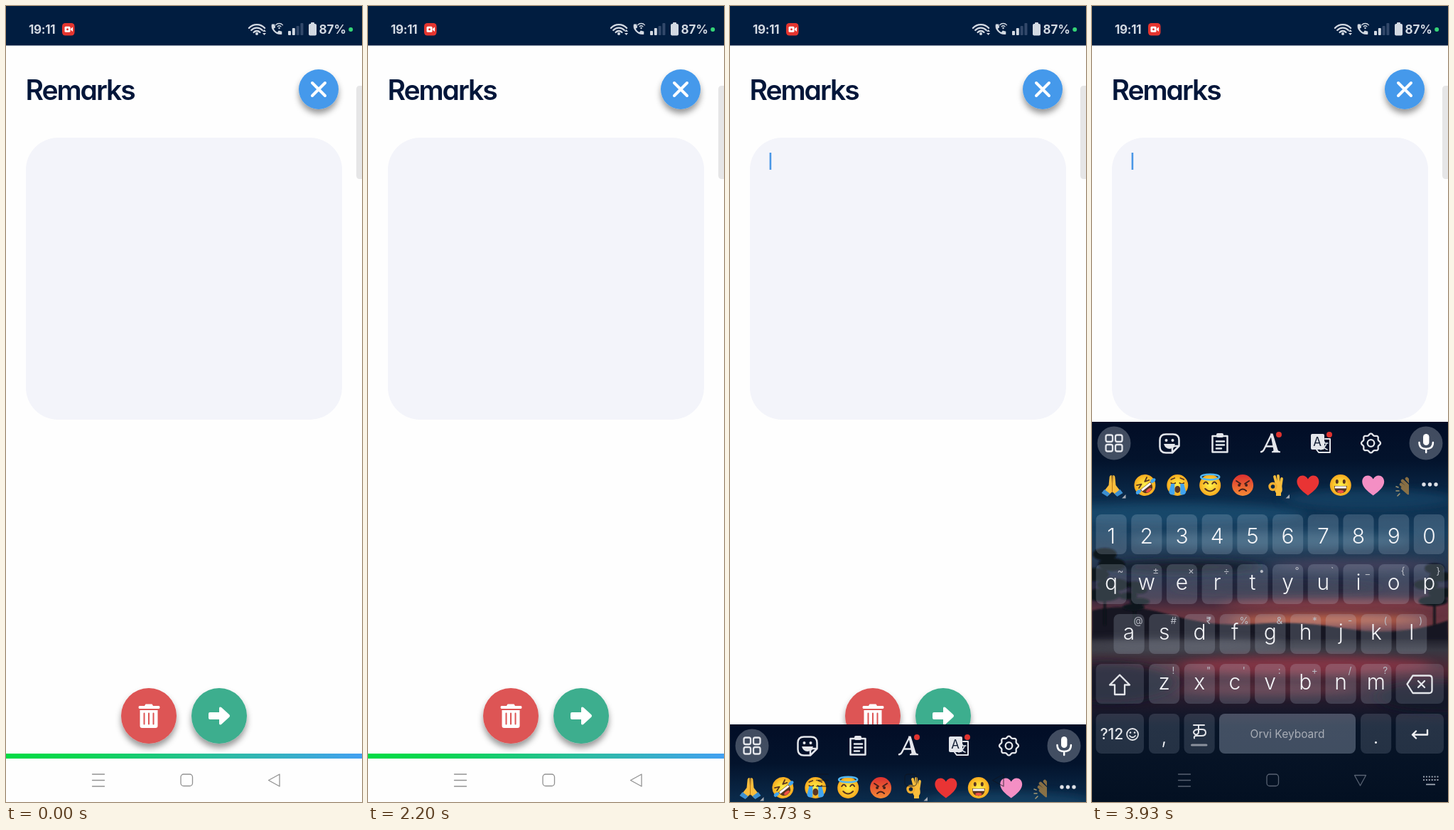
These frames come from a looping animation (501x1118 px, 4000 ms). An HTML page:

```html
<!DOCTYPE html>
<html lang="en">
<head>
<meta charset="utf-8">
<title>Remarks</title>
<style>
html, body { margin: 0; width: 100%; height: 100%; overflow: hidden; background: #fff; }
svg { display: block; width: 100vw; height: 100vh; }
text { font-family: Inter, Roboto, sans-serif; }
.title { font-size: 39px; font-weight: 600; letter-spacing: -2px; font-feature-settings: "cv11"; fill: #02163a; }
.status { font-size: 17px; font-weight: 650; fill: #d3d9e2; }
.key { font-size: 30px; font-weight: 360; fill: #f4f5f8; text-anchor: middle; }
.hint { font-size: 13.5px; fill: #b9bcc5; text-anchor: middle; }
.line { fill: none; stroke-linecap: round; stroke-linejoin: round; }
</style>
</head>
<body>
<svg id="stage" viewBox="0 0 501 1118">
  <defs>
    <linearGradient id="bar">
      <stop offset="0" stop-color="#00db45"/><stop offset=".2" stop-color="#08d650"/>
      <stop offset=".6" stop-color="#2bbd9e"/><stop offset="1" stop-color="#42a0f2"/>
    </linearGradient>
    <linearGradient id="sky" x1="0" y1="0" x2="0" y2="533" gradientUnits="userSpaceOnUse">
      <stop offset="0" stop-color="#020d26"/><stop offset=".1" stop-color="#03132c"/>
      <stop offset=".2" stop-color="#0b2b4b"/><stop offset=".29" stop-color="#163d5d"/>
      <stop offset=".36" stop-color="#243a54"/><stop offset=".42" stop-color="#222740"/>
      <stop offset=".46" stop-color="#30263b"/><stop offset=".5" stop-color="#62323f"/>
      <stop offset=".54" stop-color="#6d363f"/><stop offset=".57" stop-color="#1d1d29"/>
      <stop offset=".6" stop-color="#383842"/><stop offset=".65" stop-color="#4f2735"/>
      <stop offset=".72" stop-color="#281b2c"/><stop offset=".8" stop-color="#081528"/>
      <stop offset="1" stop-color="#031022"/>
    </linearGradient>
    <radialGradient id="sun"><stop offset="0" stop-color="#fff04d"/><stop offset=".6" stop-color="#fdca2f"/><stop offset="1" stop-color="#f7a91f"/></radialGradient>
    <linearGradient id="mad" x2="0" y2="1"><stop offset="0" stop-color="#dc3030"/><stop offset="1" stop-color="#f58a35"/></linearGradient>
    <filter id="soft" x="-50%" y="-150%" width="200%" height="400%"><feGaussianBlur stdDeviation="9 6"/></filter>
    <filter id="edge"><feGaussianBlur stdDeviation="1.2"/></filter>
    <filter id="drop" x="-30%" y="-30%" width="160%" height="170%"><feDropShadow dx="0" dy="6" stdDeviation="4" flood-opacity=".4"/></filter>
    <clipPath id="board"><rect y="-1" width="501" height="536"/></clipPath>
    <clipPath id="cut"><rect x="420" y="70" width="26" height="40"/></clipPath>
  </defs>

  <rect width="501" height="1118" fill="#fefefe"/>
  <rect width="501" height="55.5" fill="#011d40"/>
  <g id="status"></g>

  <text class="title" x="27.500" y="131.800">Remarks</text>
  <circle cx="440" cy="117" r="28" fill="#4499eb" filter="url(#drop)"/>
  <path class="line" d="M431 108l18 18m0-18l-18 18" stroke="#fff" stroke-width="4"/>
  <path d="M501 112h-3q-5 0-5 5v121q0 5 5 5h3z" fill="#e6e6e7"/>
  <rect x="28" y="185" width="445" height="396" rx="45" fill="#f3f4fa"/>

  <circle cx="201" cy="997" r="39" fill="#dd5555" filter="url(#drop)"/>
  <path d="M195 983l1.500-2.500h9l1.500 2.500h8q1.500 0 1.500 2t-1.500 2h-27q-1.500 0-1.500-2t1.500-2zM188.500 989h25v22q0 3-3 3h-19q-3 0-3-3z" fill="#fff"/>
  <path class="line" d="M194.500 993.500v15m6.500-15v15m6.500-15v15" stroke="#dd5555" stroke-width="2"/>
  <circle cx="300" cy="997" r="39" fill="#3eae8e" filter="url(#drop)"/>
  <path d="M287 992h13v-5.500q0-3 3-1.500l11 10q2 2 0 4l-11 10q-3 1.500-3-1.500v-5.500h-13q-2 0-2-2v-6q0-2 2-2z" fill="#fff"/>
  <rect y="1050" width="501" height="7" fill="url(#bar)"/>

  <circle id="touch" cx="247.500" cy="241" r="12.500" fill="#dcdde0" stroke="#b7c4d5" stroke-width="2"/>
  <rect id="caret" x="55.600" y="206" width="2.600" height="24" fill="#4a97e6"/>
  <g id="keyboard" clip-path="url(#board)"></g>
  <g id="nav" class="line" stroke-width="1.300">
    <path d="M121.500 1079h17m-17 8.500h17m-17 8.500h17"/>
    <rect x="246" y="1079" width="16.500" height="16.500" rx="4"/>
    <path id="back"/>
  </g>
  <g id="hide" fill="#a5acb8"></g>
</svg>
<script>
const $ = id => document.getElementById(id);
const LOOP = 4000, PITCH = 49.7;

const line = (d, color, w, more = '') =>
  `<path class="line" d="${d}" stroke="${color}" stroke-width="${w}" ${more}/>`;
const fill = (d, color, more = '') => `<path d="${d}" fill="${color}" ${more}/>`;
const dot = (x, y, r, color) => `<circle cx="${x}" cy="${y}" r="${r}" fill="${color}"/>`;
const oval = (x, y, rx, ry, color, more = '') =>
  `<ellipse cx="${x}" cy="${y}" rx="${rx}" ry="${ry}" fill="${color}" ${more}/>`;
const box = (x, y, w, h, r, color, more = '') =>
  `<rect x="${x}" y="${y}" width="${w}" height="${h}" rx="${r}" fill="${color}" ${more}/>`;
const label = (cls, x, y, s, more = '') => {
  const safe = s.replace('&', '&amp;').replace('<', '&lt;');
  return `<text class="${cls}" x="${x}" y="${y}" ${more}>${safe}</text>`;
};
const arc = (x, y, r) => {
  const k = r * 0.74, h = r * 0.67;
  return `M${x - k} ${y - h}A${r} ${r} 0 0 1 ${x + k} ${y - h}`;
};

function statusBar() {
  const c = '#d3d9e2';
  const bars = [6, 10, 13, 17].map((h, i) =>
    box(397 + i * 5.8, 41 - h, 4, h, 1, i < 2 ? c : '#32486a')).join('');
  return label('status', 32, 38.5, '19:11', 'letter-spacing="-.3"') +
    box(79, 24, 17.500, 17.500, 4.500, '#e5352f') +
    box(82.500, 28.800, 8, 8, 1.500, '#fff') + dot(86.500, 32.800, 1.500, '#e5352f') + fill('M91 32l3-2.500v6.500l-3-2.500z', '#fff') +
    line(arc(353, 41, 6) + arc(353, 41, 10.5) + arc(353, 41, 15), c, 2.300) + dot(353, 39, 2, c) +
    fill('M361 36l2.500-3 2.500 3zM361 38l2.500 3 2.500-3z', c) +
    fill('M374 25.500h4l1.200 4.500-2.400 2q1.700 3.300 5 5l2-2.400 4.500 1.200v4q-7 1-11.500-4t-2.800-10.300z', c) +
    line(arc(384.5, 31, 3.2) + arc(384.5, 31, 6.5), c, 1.400) + dot(384.500, 31, 1.200, c) +
    bars + box(426, 25, 11, 16.500, 2, c) + box(429, 23, 5, 3, 1, c) +
    label('status', 440.5, 38.7, '87%') + dot(485.200, 33, 3, '#35d577');
}

function scenery() {
  const blur = 'filter="url(#soft)"';
  const tree = (x, y, w, h) => {
    let s = '';
    for (let i = 0; i < 5; i++)
      s += oval(x + Math.sin(i * 2.4) * w * 0.3, y + i * h / 7, w * (0.35 + i * 0.04), h / 11, '#0d121d');
    return s + box(x - 1.5, y, 3, h, 0, '#0d121d');
  };
  return box(0, -1, 501, 536, 0, 'url(#sky)') +
    oval(110, 128, 190, 15, '#1e5479', blur + ' opacity=".6"') +
    oval(390, 108, 120, 14, '#174567', blur + ' opacity=".7"') +
    oval(250, 166, 200, 11, '#3f6a86', blur + ' opacity=".6"') +
    oval(130, 203, 110, 9, '#171a2c', blur) +
    oval(370, 200, 120, 8, '#4d4560', blur + ' opacity=".7"') +
    oval(260, 232, 150, 7, '#1f2036', blur + ' opacity=".7"') +
    oval(350, 256, 170, 8, '#9a434a', blur + ' opacity=".7"') +
    oval(330, 277, 140, 6, '#d9734e', blur + ' opacity=".9"') +
    fill('M0 264Q50 252 110 270T230 283T360 290T501 278V304H0Z', '#151822', 'filter="url(#edge)"') +
    `<g filter="url(#edge)">${tree(18, 185, 48, 100)}${tree(60, 228, 30, 55)}${tree(482, 205, 40, 80)}</g>` +
    oval(110, 312, 160, 8, '#55545f', blur + ' opacity=".6"') +
    oval(300, 341, 180, 13, '#97374a', blur + ' opacity=".7"') +
    oval(245, 375, 130, 8, '#6d3341', blur + ' opacity=".6"') +
    oval(20, 365, 100, 28, '#111725', blur + ' opacity=".8"') +
    oval(490, 385, 90, 22, '#111725', blur + ' opacity=".7"');
}

function toolbar() {
  const c = '#e4e6eb', red = '#e0332f';
  const grid = [0, 1, 2, 3].map(i =>
    box(19.5 + i % 2 * 13.5, 17.5 + (i >> 1) * 13.5, 9.500, 9.500, 2.500, 'none', `stroke="${c}" stroke-width="2.300"`)).join('');
  let gear = '';
  for (let i = 0; i <= 64; i++) {
    const a = i / 64 * Math.PI * 2, r = 12.3 + 1.2 * Math.cos(a * 8);
    gear += `${i ? 'L' : 'M'}${(392.5 + r * Math.cos(a)).toFixed(1)} ${(29 + r * Math.sin(a)).toFixed(1)}`;
  }
  return dot(31, 29, 23.5, 'rgba(200,205,215,.32)') + grid +
    line('M104 16.500h10q8.500 0 8.500 8.500v8l-9.500 9.500h-9q-8.500 0-8.500-8.500v-9q0-8.500 8.500-8.500zM122 33h-5q-4 0-4 4v5', c, 2.500) +
    dot(104.500, 25, 2, c) + dot(113.500, 25, 2, c) + fill('M101 30h16q-2 7-8 7t-8-7z', c) +
    line('M169.500 19h21v22.500h-21zM175 26.500h11m-11 5h11m-11 5h7', c, 2.500) + box(175, 15, 10, 6, 2, c) +
    fill('M251 15.500h3.500l7 23q.8 2 3.500 2v1.800h-12v-1.800q3 0 2.300-2.500z', c) +
    line('M252 18l-10 20q-1.500 3-4 3.300M244.500 33.500h13', c, 2.400) + dot(263, 17, 4, red) +
    box(308, 16, 19, 22, 2, c) + line('M328 23h7v19h-16l-3-4', c, 2) +
    label('', 317, 33, 'A', 'text-anchor="middle" font-size="17" fill="#152036"') +
    line('M322 29h10m-5-2v2m3 0q-1 5-8 9m2-7q2 5 7 7', c, 1.600) + dot(334, 17, 4, red) +
    line(gear + 'z', c, 2.300) + `<circle cx="392.500" cy="29" r="4.800" fill="none" stroke="${c}" stroke-width="2.300"/>` +
    dot(470, 29, 23.5, 'rgba(200,205,215,.32)') + box(466, 16, 8.500, 16, 4.250, '#fff') +
    line('M460.500 28q0 9 9.700 9t9.700-9M470.200 37v5', '#fff', 2.500);
}

function emojis() {
  const skin = '#f9bd3c', ink = '#5a3520', blue = '#42a5f0';
  const at = (x, s, turn = 0) => `<g transform="translate(${x} 88) rotate(${turn})">${s}</g>`;
  const face = (s, color = 'url(#sun)') => dot(0, 0, 15, color) + s;
  const heart = c => fill('M0 14.500C-9 8-15.500 2-15.500-5C-15.500-14-4.500-17 0-8.500C4.500-17 15.500-14 15.500-5C15.500 2 9 8 0 14.500Z', c);
  const mouth = fill('M-9 1h18q0 10.500-9 10.500T-9 1z', ink) + fill('M-8 1.500h16v3h-16z', '#fff') + oval(0, 9, 4.500, 2, '#ef4f45');
  const pray = fill('M-1-14q-3 0-3 4l-1 10-7 9 6 6 6-6zM1-14q3 0 3 4l1 10 7 9-6 6-6-6z', skin) +
    fill('M-11 6l8 6-4 4-8-5zM11 6l-8 6 4 4 8-5z', '#3c8fd0') + line('M0-13V10', '#b97818', 1);
  const rofl = face(line('M-9-7l6 3-6 2M9-7l-6 3 6 2', ink, 1.800) + mouth + oval(-13, 2, 4, 2.500, blue) + oval(13, 2, 4, 2.500, blue));
  const sob = face(line('M-9-3q3 2 6 0M3-3q3 2 6 0M-9-8l5-2M9-8l-5-2', ink, 1.700) +
    oval(0, 6, 4, 5, ink) + fill('M-9-2h5v15q-6 2-8-3zM9-2h-5v15q6 2 8-3z', blue));
  const angel = face(line('M-9-2q3-5 6 0M3-2q3-5 6 0M-7 5q7 7 14 0', ink, 1.900)) +
    '<ellipse cy="-11.500" rx="13" ry="3.800" fill="none" stroke="#52b6f2" stroke-width="2.600"/>';
  const angry = face(line('M-9-6l6 4M9-6l-6 4M-5 8q5-5 10 0', '#44201c', 2) + dot(-5, 0, 2, '#44201c') + dot(5, 0, 2, '#44201c'), 'url(#mad)');
  const okay = line('M3 3L-1-12M5 3L4-13M7 4L9-9', skin, 3.800) +
    fill('M0 1h9q2 7-1 10v4h-7v-4q-3-3-1-10z', skin) +
    '<circle cx="-3.500" cy="2" r="4.500" fill="none" stroke="#f2ae30" stroke-width="3.400"/>';
  const smile = face(oval(-5, -5, 2, 3, ink) + oval(5, -5, 2, 3, ink) + mouth);
  const clap = line('M-3-6L8 4M-5-1L7 8M-3 4L5 11M3-9l8 9', '#a98245', 4.500) + line('M-9 3l-3-1m4 6h-4m5 4l-3 3', '#cdb37a', 1.500);
  return [pray, rofl, sob, angel, angry, okay, heart('#e93434'), smile, heart('#f48fc4')]
    .map((s, i) => at(28.5 + i * 45.9, s, i === 1 ? -38 : 0)).join('') +
    `<g clip-path="url(#cut)" opacity=".8">${at(440, clap)}</g>` +
    [467, 475.500, 484].map(x => dot(x, 87, 2.700, '#dfe2e8')).join('') +
    fill('M47.500 101v5.500h-5.500zM278 101v5.500h-5.500z', '#a6abb5');
}

function keys() {
  const cap = (x, y, w = 43.2, a = 0.19) => box(x, y, w, 56, 8, `rgba(205,220,240,${a})`);
  const row = (letters, hints, x0, y) => [...letters].map((s, i) => {
    const x = x0 + i * PITCH;
    return cap(x, y) + label('key', x + 21.6, y + (hints ? 36 : 40.5), s) +
      (hints ? label('hint', x + 34.5, y + 13.5, hints[i]) : '');
  }).join('');
  const c = '#e4e6ea';
  return row('1234567890', '', 5.5, 129) +
    row('qwertyuiop', '~±×÷•°`_{}', 5.5, 199) +
    row('asdfghjkl', '@#₹%&*-()', 30.5, 269) +
    row('zxcvbnm', '!"\':+/?', 80, 339) +
    cap(5.5, 339, 67.5, 0.15) + line('M39 354.500l14 14h-7v13.500h-14v-13.500h-7z', c, 2.300) +
    cap(427.5, 339, 67.5, 0.15) + line('M443.500 367.500l8-12h23q4 0 4 4v16.500q0 4-4 4h-23zM459 363l9 9m0-9l-9 9', c, 2.300) +
    cap(5.5, 409, 67.5, 0.15) + label('', 11.5, 445, '?12', `font-size="21" font-weight="550" fill="${c}"`) +
    line('M65 438a8 8 0 1 1-16 0a8 8 0 1 1 16 0M53 440q4 4.500 8 0', c, 1.800) + dot(54, 435.500, 1.300, c) + dot(60, 435.500, 1.300, c) +
    cap(80, 409, 43.2, 0.15) + label('key', 101.5, 451, ',') +
    cap(129.5, 409, 43.2, 0.15) + box(139, 451.500, 23.500, 3, 1.500, '#8b919d') +
    line('M143 425h15M150 425v10q-1 4-5 3-4-3 0-6 2-1 5-1h5q5 0 5 4.500t-6 4.500h-7q-4 0-3 3.500', c, 2) +
    cap(179, 409, 192, 0.29) + label('', 275, 443, 'Orvi Keyboard', 'text-anchor="middle" font-size="15.500" fill="#a8adb6"') +
    cap(378, 409, 43.2, 0.15) + label('key', 399.5, 451, '.') +
    cap(427.5, 409, 67.5, 0.15) + line('M472 432v6.500h-21m5-5l-5 5 5 5', '#f0f1f4', 2.400);
}

$('status').innerHTML = statusBar();
$('keyboard').innerHTML = scenery() + toolbar() + emojis() + keys();
let pad = box(470, 1092.5, 13, 1.8, 0.5, '#a5acb8');
for (let i = 0; i < 12; i++) pad += box(466 + i % 6 * 3.9, 1081.5 + (i / 6 | 0) * 4.5, 2, 2, 0.4, '#a5acb8');
$('hide').innerHTML = pad;

// The keyboard rises in the uneven steps of a busy phone screen.
const rise = [[3930, 585], [3870, 680], [3800, 712.5], [3730, 1010], [0, 1118]];

function draw(t) {
  const top = rise.find(([from]) => t >= from)[1];
  const open = top < 600, up = top < 1118;
  $('keyboard').setAttribute('transform', `translate(0 ${top})`);
  $('keyboard').setAttribute('display', up ? 'inline' : 'none');
  $('touch').setAttribute('opacity', t < 3470 || t >= 3600 ? 0 : t < 3530 ? 1 : 0.6);
  $('caret').setAttribute('opacity', t >= 3600 ? 1 : 0);
  $('nav').setAttribute('stroke', open ? '#586272' : up ? '#10131d' : '#929292');
  $('nav').setAttribute('opacity', up && !open ? 0.6 : 1);
  $('back').setAttribute('d', open ? 'M369.500 1080.500h16l-8 14.500z' : 'M369.500 1087.500l15.500-8.500v17z');
  $('hide').setAttribute('opacity', open ? 1 : 0);
}

const start = performance.now();
function tick() {
  draw((performance.now() - start) % LOOP);
  requestAnimationFrame(tick);
}
tick();
</script>
</body>
</html>
```
